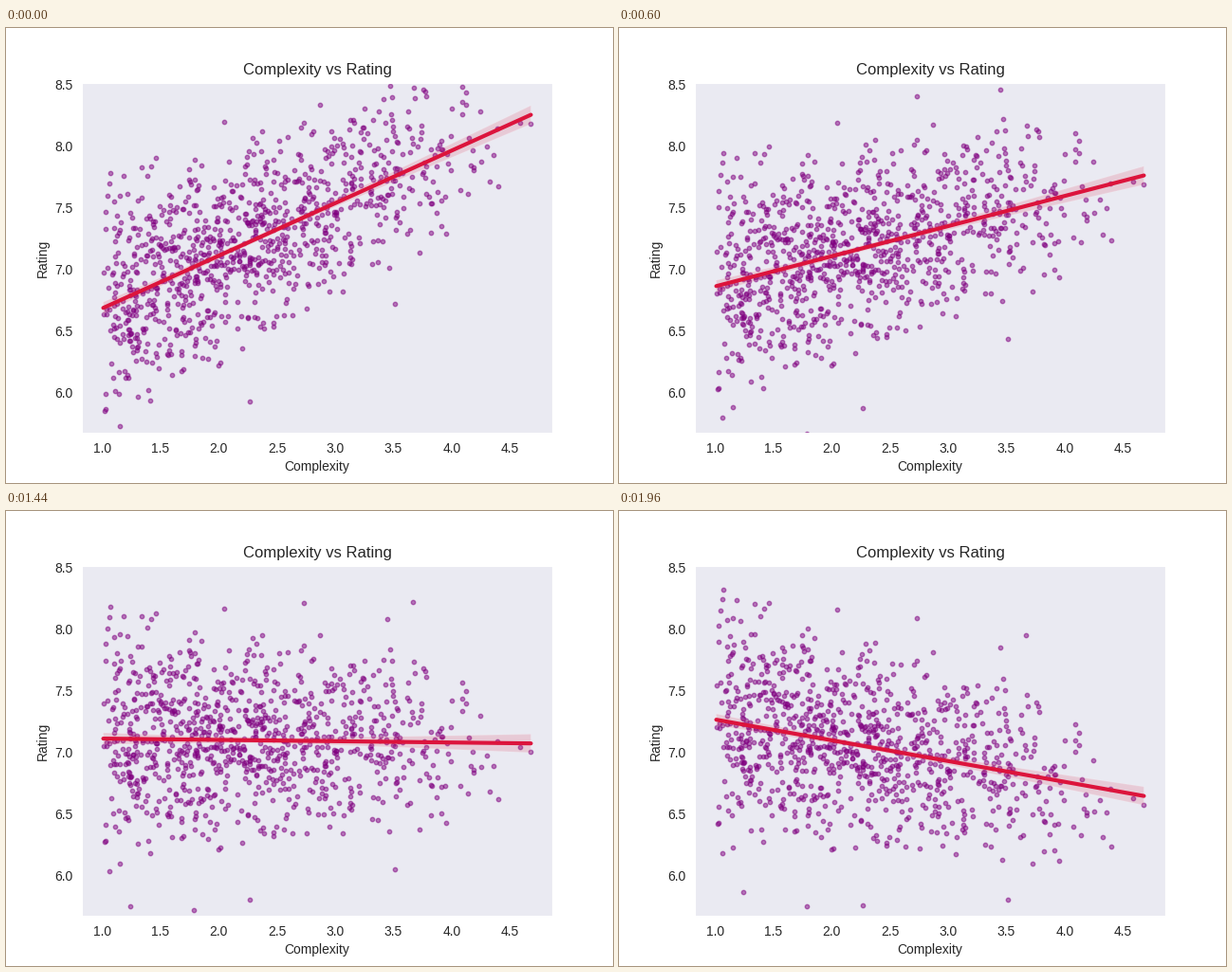
A matplotlib script for the animation above (2 s loop, 640 by 480 pixels).

```python
import numpy as np
import matplotlib.pyplot as plt
from matplotlib.animation import FuncAnimation

plt.rcParams.update({
    "font.family": "Liberation Sans",
    "text.color": ".15",
    "axes.labelcolor": ".15",
    "axes.facecolor": "#EAEAF2",
    "axes.edgecolor": "white",
    "xtick.color": ".15",
    "ytick.color": ".15",
    "xtick.bottom": False,
    "ytick.left": False,
    "lines.solid_capstyle": "round",
})

FRAMES, INTERVAL = 50, 40
COUNT = 1000
X_MIN, X_MAX = 1.01, 4.68
PIVOT_X, PIVOT_Y = 1.98, 7.10
SLOPE_START, SLOPE_STEP = 0.4282, 0.01219

# Lone points outside the cloud: complexity, distance from the trend
LONE = np.array([
    (1.07, 1.07), (1.34, 1.00), (2.05, 1.07), (2.73, 1.12), (3.45, 1.00),
    (3.67, 1.14), (4.59, -0.03), (4.68, -0.07), (3.51, -1.04),
    (2.27, -1.30), (1.79, -1.39), (1.24, -1.36),
])


def make_cloud(count, seed=7):
    """Skewed complexities, with more scatter among the simple ones."""
    rng = np.random.default_rng(seed)
    span = X_MAX - X_MIN
    x = X_MIN + span * rng.beta(1.6, 2.7, 2 * count)
    simple = rng.random(x.size) < 0.06
    x[simple] = rng.uniform(X_MIN, 1.35, simple.sum())
    z = rng.normal(size=x.size)
    sd = 0.35 + 0.13 * np.exp((1 - x) / 0.8)
    keep = (np.abs(z) < 2.5) & (x < 4.45)
    return np.column_stack([x, z * sd])[keep][:count]


def trend(x, slope):
    return PIVOT_Y + slope * (x - PIVOT_X)


px, resid = np.vstack([make_cloud(COUNT - len(LONE)), LONE]).T

grid = np.linspace(X_MIN, X_MAX, 100)
half = 0.0245 * np.sqrt(1 + ((grid - 2.35) / 0.8) ** 2)
band_x = np.concatenate([grid, grid[::-1]])

fig, ax = plt.subplots(figsize=(6.4, 4.8), dpi=100)
margin = 0.05 * (X_MAX - X_MIN)
ax.set(title="Complexity vs Rating", xlabel="Complexity", ylabel="Rating",
       xlim=(X_MIN - margin, X_MAX + margin), ylim=(5.667, 8.518),
       xticks=np.arange(1, 4.6, 0.5), yticks=np.arange(6, 8.6, 0.5))

dots = ax.scatter(px, resid + PIVOT_Y, s=10, color="purple", alpha=0.5)
band, = ax.fill(band_x, band_x, facecolor="crimson", edgecolor="white",
                alpha=0.15)
line, = ax.plot([], [], color="crimson", lw=3)


def update(i):
    slope = SLOPE_START - SLOPE_STEP * i
    fit = trend(grid, slope)
    dots.set_offsets(np.column_stack([px, trend(px, slope) + resid]))
    edge = np.concatenate([fit + half, (fit - half)[::-1]])
    band.set_xy(np.column_stack([band_x, edge]))
    line.set_data(grid, fit)
    return dots, band, line


anim = FuncAnimation(fig, update, frames=FRAMES, interval=INTERVAL,
                     repeat=True, repeat_delay=0)
plt.show()
```
